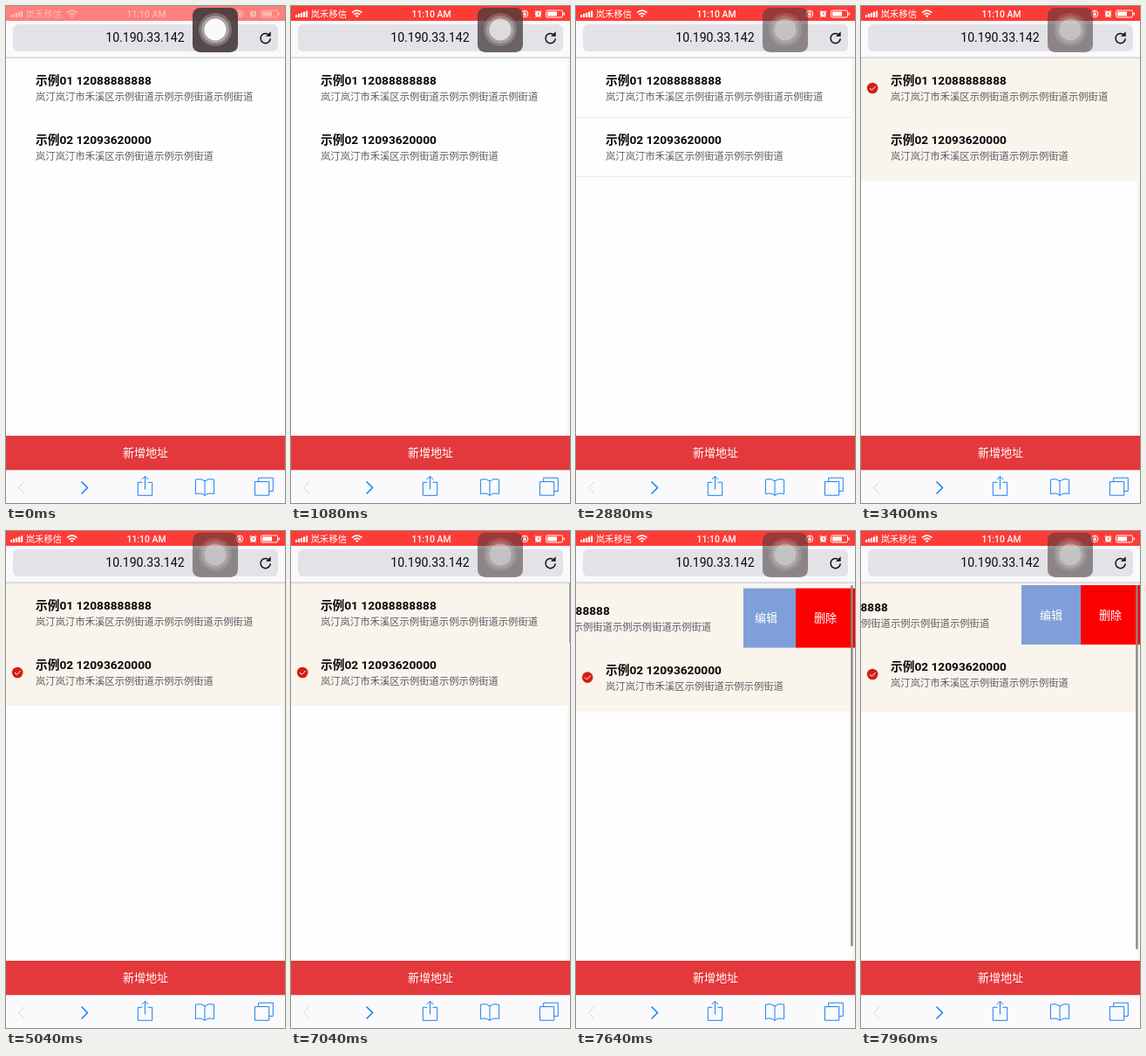
An HTML page that plays this animation: 320 px wide and 569 px high, repeating every 8000 ms.

```html
<!DOCTYPE html>
<html lang="zh-CN">
<head>
<meta charset="utf-8">
<title>地址列表</title>
<style>
html, body { margin: 0; width: 100%; height: 100%; overflow: hidden; background: #fff; }
svg { display: block; width: 100%; height: 100%; }
text { font-family: Roboto, "Noto Sans CJK SC", "Noto Sans CJK", sans-serif; fill: #fff; }
.name { font-size: 13.7px; font-weight: 700; fill: #080808; }
.addr { font-size: 11.33px; fill: #5c5a60; }
.label { font-size: 13px; text-anchor: middle; }
.line { fill: none; stroke: #1a80f2; stroke-width: 1; }
.thin { fill: none; stroke: #fff; stroke-width: 1; }
</style>
</head>
<body>
<svg viewBox="0 0 320 569">
  <rect width="320" height="569" fill="#fefdff"/>
  <rect id="edge" x="317" y="60" width="3" height="432" fill="#f9f4ec"/>
  <rect id="tint" y="60" width="320" height="140" fill="#f9f4ec"/>

  <g id="list">
    <g id="swipe">
      <rect x="184" y="60" width="68" height="68" fill="#7f9fd8"/>
      <rect x="252" y="60" width="68" height="68" fill="#fb0000"/>
      <text class="label" x="218" y="98.5">编辑</text>
      <text class="label" x="286" y="98.5">删除</text>
    </g>
    <g id="row">
      <rect id="cover" y="59" width="320" height="70" fill="#f9f4ec"/>
      <text class="name" x="34" y="90">示例01 12088888888</text>
      <text class="addr" x="34" y="108">岚汀岚汀市禾溪区示例街道示例示例街道示例街道</text>
    </g>
    <text class="name" x="34" y="158">示例02 12093620000</text>
    <text class="addr" x="34" y="176">岚汀岚汀市禾溪区示例街道示例示例街道</text>
    <rect id="rule1" y="127" width="317" height="1" fill="#ebe9ea"/>
    <rect id="rule2" y="195" width="317" height="1" fill="#ebe9ea"/>
    <rect id="gap" y="195" width="317" height="1" fill="#fff"/>
    <g id="tick">
      <circle cx="13.2" cy="162" r="6.3" fill="#d31f12"/>
      <path class="thin" d="M10 162l2.4 2.4 4.3-4.4"/>
    </g>
  </g>
  <rect id="sliver" x="319" y="59" width="1" height="69" fill="#a3a09f"/>
  <rect id="scroll" x="315.2" y="62" width="2.4" rx="1.2" fill="#8b8681"/>

  <rect y="17" width="320" height="42" fill="#faf9fb"/>
  <rect y="58.6" width="320" height="1" fill="#bdbcc0"/>
  <rect x="8" y="21" width="304" height="31" rx="6" fill="#e3e2e6"/>
  <text x="159.4" y="41" font-size="14.1" text-anchor="middle" style="fill:#0a0a0a">10.190.33.142</text>
  <path d="M303.2 37.2A5.6 5.6 0 1 1 300.4 32.2" fill="none" stroke="#111" stroke-width="1.5"/>
  <path d="M303.6 29.2v5.6h-5.6z" fill="#111"/>

  <rect width="320" height="17" fill="#fd3c37"/>
  <rect id="haze" width="320" height="17" fill="#fff"/>
  <g id="status">
    <g id="bars" fill="#fff"></g>
    <text x="22.8" y="12.7" font-size="10.3">岚禾移信</text>
    <g fill="none" stroke="#fff" stroke-width="1.6">
      <path d="M70 7.6q5.7-4.8 11.4 0M72.1 9.8q3.6-3 7.2 0"/>
    </g>
    <path d="M73.9 11.3q1.8-1.4 3.6 0l-1.8 2z" fill="#fff"/>
    <text x="161" y="12.8" font-size="10.4" font-weight="500" text-anchor="middle">11:10 AM</text>
    <circle class="thin" cx="268" cy="9" r="3.8"/>
    <rect x="266.4" y="8.4" width="3.2" height="2.6" fill="#fff"/>
    <path class="thin" d="M267 8.5V7.6a1 1 0 0 1 2 0v.9"/>
    <circle cx="283.5" cy="9.2" r="3.4" fill="#fff"/>
    <path class="thin" d="M279.6 6.8l1.8-1.8M287.4 6.8l-1.8-1.8M281.4 12l-1 1.2M285.6 12l1 1.2"/>
    <path d="M283.5 7.2v2.2h1.5" fill="none" stroke="#fd3c37" stroke-width=".8"/>
    <rect class="thin" x="292.5" y="5" width="19" height="8" rx="1.6"/>
    <rect x="294" y="6.5" width="11" height="5" fill="#fff"/>
    <rect x="312.6" y="7.5" width="1.3" height="3" fill="#fff"/>
  </g>

  <rect id="pad" x="214" y="2" width="52" height="51" rx="8.5" fill="#453a3b"/>
  <g id="knob" fill="#fff">
    <circle cx="240" cy="27" r="19" opacity=".23"/>
    <circle cx="240" cy="27" r="15.8" opacity=".34"/>
    <circle cx="240" cy="27" r="12.5" opacity=".94"/>
  </g>

  <rect y="492" width="320" height="39.5" fill="#e4393c"/>
  <text class="label" x="160" y="516.2">新增地址</text>
  <rect y="531.5" width="320" height="38" fill="#faf9fb"/>
  <g class="line">
    <path d="M21 544.5l-6.5 7 6.5 7" stroke="#d6d4da"/>
    <path d="M86.5 544.5l7 7-7 7" stroke-width="1.5"/>
    <path d="M156.3 545.3h-5v15h16.4v-15h-5M159.5 553.5v-15M155.8 542l3.7-3.7 3.7 3.7"/>
    <path d="M228 543.8q-4.5-3.6-10.6-1.6v16.4q6.4-1.8 10.6 1.8 4.2-3.6 10.6-1.8v-16.4q-6.1-2-10.6 1.6zv16.4"/>
    <path d="M289.7 544.6v-4.4h16.6v15.2h-4.6M285.4 544.6h16.3v15.6h-16.3z"/>
  </g>
</svg>
<script>
const LOOP = 8000;
const $ = id => document.getElementById(id);
const set = (id, attrs) => {
  for (const key in attrs) $(id).setAttribute(key, attrs[key]);
};
const show = (id, on) => set(id, { visibility: on ? 'visible' : 'hidden' });

// Linear track through [time, value] pairs, held at both ends.
const track = (t, keys) => {
  const i = keys.findIndex(k => k[0] > t);
  if (i === 0) return keys[0][1];
  if (i < 0) return keys[keys.length - 1][1];
  const [t0, v0] = keys[i - 1], [t1, v1] = keys[i];
  return v0 + (v1 - v0) * (t - t0) / (t1 - t0);
};

const FADE_IN = [[120, 0], [920, 1]];
const PAD = [[960, .9], [1080, .76], [1920, .55]];
const KNOB = [[960, 1], [1080, .8], [1920, .5]];
const SWIPE = [[7040, 0], [7120, 10], [7240, 42], [7400, 88], [7520, 114], [7640, 128], [7800, 136]];
const PULL = [[7160, 0], [7400, 4], [7560, 6], [7640, 5.6], [7800, 3.4], [7960, 2]];

$('bars').innerHTML = [0, 1, 2, 3, 4].map(i => {
  const h = 3 + i * 1.15;
  return `<rect x="${5 + i * 3}" y="${13 - h}" width="2.2" height="${h}" rx=".4"/>`;
}).join('');

function draw(t) {
  const lit = track(t, FADE_IN);
  set('haze', { opacity: .34 * (1 - lit) });
  set('status', { opacity: .45 + .55 * lit });
  set('pad', { opacity: track(t, PAD) });
  set('knob', { opacity: track(t, KNOB) });
  show('edge', t >= 960);

  const tintHeight = t < 3000 ? 0 : t < 3240 ? 77 : t < 7240 ? 140 : 147;
  set('tint', { height: tintHeight });
  show('rule1', t >= 1760 && t < 3000);
  show('rule2', t >= 1760 && t < 3240);
  show('tick', t >= 3240);
  set('tick', { transform: `translate(0 ${t < 4840 ? -68 : 0})` });

  const shift = track(t, SWIPE), pull = track(t, PULL);
  const open = t >= 7080;
  show('swipe', open);
  show('cover', open);
  set('row', { transform: `translate(${-shift} 0)` });
  set('list', { transform: `translate(0 ${pull})` });
  show('gap', t >= 7240 && t < 7880);
  show('sliver', t >= 7040 && t < 7080);
  show('scroll', t >= 7200);
  set('scroll', { height: 419 - pull });
}

const start = performance.now();
function tick() {
  draw((performance.now() - start) % LOOP);
  requestAnimationFrame(tick);
}
tick();
</script>
</body>
</html>
```
